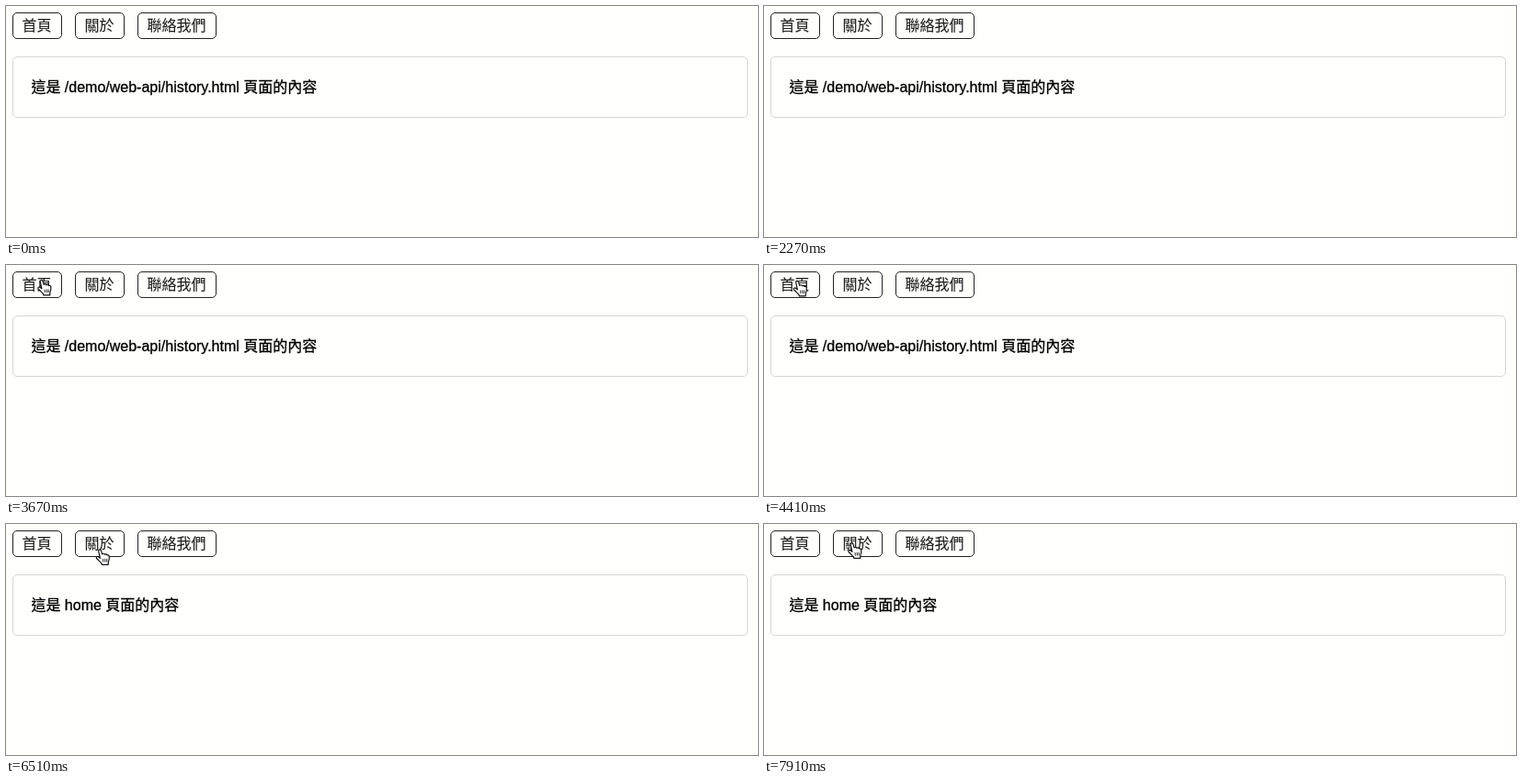
An HTML page with a canvas for the animation above (8000 ms loop, 818 by 252 pixels).

```html
<!DOCTYPE html>
<html lang="zh-Hant">
<head>
<meta charset="utf-8">
<title>History demo</title>
<style>
  html, body { margin: 0; width: 100%; height: 100%; overflow: hidden; background: #fffffb; }
  canvas { display: block; width: 818px; height: 252px; }
</style>
</head>
<body>
<canvas id="stage"></canvas>
<script>
const W = 818, H = 252, LOOP = 8000, PAGE_SWITCH = 4990;
const canvas = document.getElementById('stage');
const ctx = canvas.getContext('2d');
const dpr = window.devicePixelRatio || 1;
canvas.width = W * dpr;
canvas.height = H * dpr;

const buttons = [
  { x: 7, w: 54, label: '首頁' },
  { x: 75, w: 54, label: '關於' },
  { x: 143, w: 86, label: '聯絡我們' }
];

// Pointer hotspot as [time, x, y]; the pointer is off stage at the outer ends.
const path = [
  [470, -14, 42], [750, 144, 134], [1010, 144, 134], [1150, 152, 264],
  [2270, -16, 222], [3010, 54, 10.5], [3110, 54, 10.5], [3850, 37, 17],
  [5630, 37, 17], [6370, 103, 27.5], [6510, 103, 27.5], [7070, 96.5, 20.5],
  [LOOP, 96.5, 20.5]
];

const hand = new Path2D(
  'M3.2 2.2 C2.8 .2 5.4 -.3 6 1.6 L7.2 5.4 C8 4.4 9.5 4.6 9.9 5.8 ' +
  'C10.8 4.9 12.1 5.3 12.5 6.5 C13.7 5.9 14.6 6.6 14.8 8 ' +
  'C15.2 10.6 14.6 12 13.9 13.7 L13.7 16.8 L6.8 16.8 L6.4 15.2 ' +
  'C4.8 13.8 3.2 12 1.2 10.2 C.1 8.9 1.4 7.4 2.9 8.3 L4.9 9.8 Z');
const handLines = new Path2D('M8 10.6 L8.4 14 M10.2 10.4 L10.4 14 M12.2 10.4 L12.2 14');
const arrow = new Path2D('M0 0 L0 15 L3.4 11.8 L5.7 17 L8.2 15.9 L6 10.9 L10.7 10.9 Z');

const ease = p => p * p * (3 - 2 * p);

function pointerAt(t) {
  for (let i = 1; i < path.length; i++) {
    const [t0, x0, y0] = path[i - 1], [t1, x1, y1] = path[i];
    if (t >= t0 && t <= t1) {
      const p = ease((t - t0) / (t1 - t0));
      return [x0 + (x1 - x0) * p, y0 + (y1 - y0) * p];
    }
  }
  return null;
}

function frame(x, y, w, h, r, color) {
  ctx.beginPath();
  ctx.roundRect(x + .5, y + .5, w - 1, h - 1, r);
  ctx.strokeStyle = color;
  ctx.lineWidth = 1;
  ctx.stroke();
}

// A hairline stroke gives the slightly heavier text weight.
function text(str, x, y, color, weight) {
  ctx.fillStyle = ctx.strokeStyle = color;
  ctx.lineWidth = weight;
  ctx.fillText(str, x, y);
  ctx.strokeText(str, x, y);
}

function drawPointer(x, y) {
  const over = buttons.some(b => x >= b.x && x <= b.x + b.w && y >= 7 && y <= 36);
  ctx.save();
  ctx.lineJoin = 'round';
  if (over) {
    ctx.translate(x - 5.5, y);
    ctx.fillStyle = '#fff';
    ctx.strokeStyle = '#111';
    ctx.lineWidth = 1.2;
    ctx.fill(hand);
    ctx.stroke(hand);
    ctx.lineWidth = .9;
    ctx.stroke(handLines);
  } else {
    ctx.translate(x, y);
    ctx.strokeStyle = '#fff';
    ctx.lineWidth = 2;
    ctx.stroke(arrow);
    ctx.fillStyle = '#111';
    ctx.fill(arrow);
  }
  ctx.restore();
}

function draw(t) {
  ctx.setTransform(dpr, 0, 0, dpr, 0, 0);
  ctx.fillStyle = '#fffffb';
  ctx.fillRect(0, 0, W, H);
  ctx.font = '16px "Liberation Sans", "Noto Sans CJK TC", "Noto Sans CJK", sans-serif';
  ctx.lineJoin = 'round';

  for (const b of buttons) {
    frame(b.x, 7, b.w, 29, 4.5, '#222');
    text(b.label, b.x + 10.5, 27, '#222', .1);
  }

  frame(7, 55, 800, 67, 4.5, '#d6d6d2');
  const page = t < PAGE_SWITCH ? '/demo/web-api/history.html' : 'home';
  text(`這是 ${page} 頁面的內容`, 27.4, 94, '#000', .3);

  const p = pointerAt(t);
  if (p) drawPointer(...p);
}

function tick() {
  draw(performance.now() % LOOP);
  requestAnimationFrame(tick);
}
tick();
</script>
</body>
</html>
```
